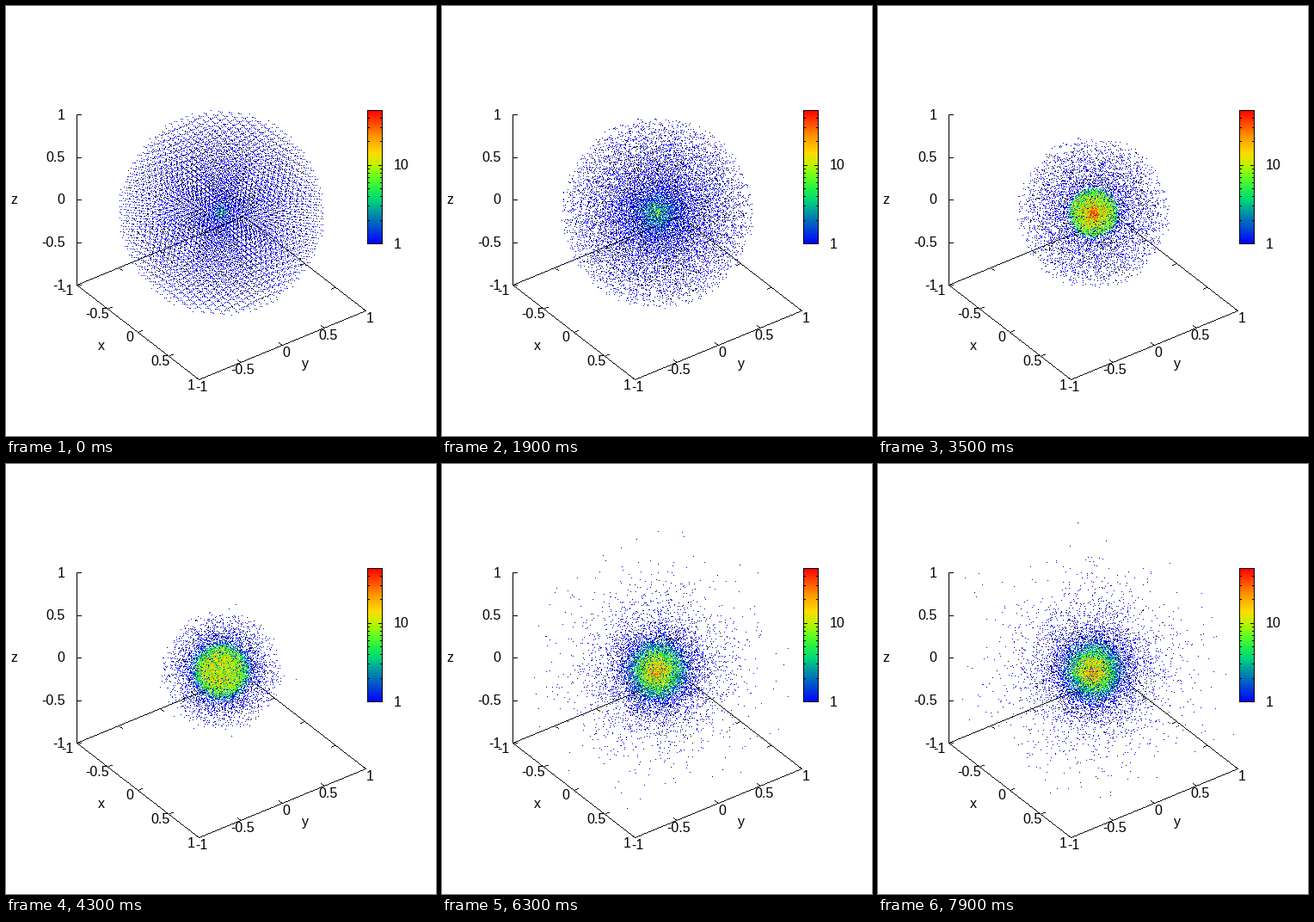
Recreate the animation shown at these times as a matplotlib script. Size 500 px wide and 500 px high, loop 8 s.

```python
import numpy as np
import matplotlib.pyplot as plt
from matplotlib.animation import FuncAnimation

SIZE, FRAMES, STEP = 500, 80, 100
plt.rcParams["font.family"] = "Liberation Sans"

fig = plt.figure(figsize=(5, 5), dpi=100, facecolor="white")
ax = fig.add_axes([0, 0, 1, 1])
ax.axis("off")
base = np.ones((SIZE, SIZE, 3))


# --- static plot box, drawn as crisp one-pixel lines ---
def project(x, y, z):
    return 250 + 71 * x + 97 * y, 240 + 55 * x - 40 * y - 99 * z


def to_pixels(v):
    return np.floor(np.asarray(v) + .5).astype(int)


def line(a, b):
    count = int(max(abs(b[0] - a[0]), abs(b[1] - a[1]))) + 1
    col, row = (np.linspace(a[k], b[k], count) for k in (0, 1))
    base[to_pixels(row), to_pixels(col)] = 0


def outline(points):
    for a, b in zip(points, points[1:] + points[:1]):
        line(a, b)


def tick(p, dx, dy):
    line(p, (p[0] + dx, p[1] + dy))


def label(x, y, text, ha="center"):
    ax.text(x, y + 5.5, text, ha=ha, va="baseline", size=11.52)


outline([project(x, y, -1) for x, y in ((-1, -1), (1, -1), (1, 1), (-1, 1))])
line(project(-1, -1, -1), project(-1, -1, 1))

for v in (-1, -.5, 0, .5, 1):
    text, shift = f"{v:g}", -2 if v < 0 else 0
    px, py = project(v, -1, -1)
    label(px - 9 + shift, py + 6, text)
    tick((px, py), 5, -2)
    tick(project(v, 1, -1), -5, 2)
    px, py = project(1, v, -1)
    label(px + 5 + shift, py + 9, text)
    tick((px, py), -4, -3)
    tick(project(-1, v, -1), 4, 3)
    px, py = project(-1, -1, v)
    label(68.5, py, text, "right")
    tick((px, py), 5, 0)

label(111, 394, "x")
label(348, 416, "y")
label(9.5, 225, "z")

# --- colour scale, logarithmic from 1 to 50 ---
STOPS = [0, .25, .33, .42, .5, .59, .68, .8, 1]
REDS = [0, 0, 0, .16, .4, .75, 1, 1, 1]
GREENS = [0, .63, .85, .94, 1, .95, .86, .6, 0]
BLUES = [1, .62, .47, .27, .12, 0, 0, 0, 0]


def palette(v):
    return np.stack([np.interp(v, STOPS, c) for c in (REDS, GREENS, BLUES)], -1)


base[121:277, 420:438] = palette(np.linspace(1, 0, 156))[:, None]
outline([(420, 121), (437, 121), (437, 276), (420, 276)])
for k in [*range(2, 11), 20, 30, 40]:
    y = 276 - 155 * np.log(k) / np.log(50)
    size = 4 if k == 10 else 2
    tick((420, y), size, 0)
    tick((437, y), -size, 0)
label(451, 276, "1", "left")
label(451, 185, "10", "left")

# --- gas sphere: stretched lattice with density ~ 1/r ---
rng = np.random.default_rng(7)
n = 15
side = np.arange(1 - n, n) / n
grid = np.stack(np.meshgrid(side, side, side, indexing="ij"), -1).reshape(-1, 3)
dist = np.linalg.norm(grid, axis=1)
keep = (dist > 0) & (dist < 1)
grid, dist = grid[keep], dist[keep]
mix = rng.permutation(len(dist))
grid, dist = grid[mix], dist[mix]
N = len(dist)
r0 = dist ** 1.5
heading = grid / dist[:, None]

swirl = rng.normal(size=(N, 3))
scatter = rng.normal(size=(N, 3))
phase = rng.uniform(0, 2 * np.pi, (2, N))
grain = rng.normal(size=N)
dark = rng.random(N) < .25
delay = rng.uniform(0, .1, N)

# relaxed radii follow a Plummer sphere
q = rng.uniform(0, .99, N)
relaxed = .21 / np.sqrt(np.maximum(q, 1e-6) ** (-2 / 3) - 1)
omega = 2.5 / (.1 + relaxed)

ETA = np.linspace(0, np.pi / 2, 600)
FALL_T = (ETA + np.sin(2 * ETA) / 2) * 2 / np.pi
FALL_R = np.cos(ETA) ** 2


def clock(i):
    return max(0, .02 * i - .01)


def fall(r, t):
    """Radius of a freely falling shell that started at r."""
    return r * np.interp(t / (.555 * (1 + r ** 4)), FALL_T, FALL_R)


def shock(t):
    return .24 * min(1, t / .69) ** 1.2


shells = np.linspace(1e-3, 1, 4000)


def swallowed(t):
    """Starting radius of the shell that now meets the shock."""
    return shells[max(0, np.sum(fall(shells, t) <= shock(t)) - 1)]


times = np.array([clock(i) for i in range(FRAMES)])
met = np.interp(r0, [swallowed(t) for t in times], times)
bounce = np.maximum(.73, met) + delay


def density(r):
    """Mean density of a thin shell around each radius."""
    ranked = np.sort(r)
    lo = np.maximum(.9 * r - .015, 0)
    hi = 1.1 * r + .015
    count = np.searchsorted(ranked, hi) - np.searchsorted(ranked, lo)
    # beyond the outermost particle the shell is empty
    hi = np.minimum(hi, ranked[-1] + .015)
    return count / N / (4 / 3 * np.pi * (hi ** 3 - lo ** 3))


def cloud(t):
    edge = swallowed(t)
    r = np.where(r0 < edge, shock(t) * r0 / edge, fall(r0, t))
    since = np.maximum(0, t - bounce)
    w = 1 - np.exp(-since / (.1 + .13 * relaxed))
    r = r + (relaxed - r) * w
    r = r * (1 + .12 * w * np.sin(omega * t + phase[0]))
    wobble = .3 * w * np.sin(omega * t + phase[1])
    stir = .05 * min(1, t / .4) ** 2
    d = heading + stir * scatter + wobble[:, None] * swirl
    d /= np.linalg.norm(d, axis=1)[:, None]
    return r, d * r[:, None]


view = dict(extent=(0, SIZE, SIZE, 0), aspect="auto", interpolation="nearest")
ax.imshow(base, zorder=0, **view)
layer = ax.imshow(np.zeros((SIZE, SIZE, 4)), zorder=1, **view)
ax.set_xlim(0, SIZE)
ax.set_ylim(SIZE, 0)


def draw(i):
    t = clock(i)
    r, pos = cloud(t)
    rho = density(r) * np.exp(.4 * min(1, t / .5) * grain)
    level = np.clip(np.log(rho) / np.log(50), 0, 1)
    rgb = palette(level)
    rgb[dark & (level == 0)] = 0
    inside = np.all(np.abs(pos) <= 1, axis=1)
    col, row = (to_pixels(p) for p in project(*pos[inside].T))
    img = np.zeros((SIZE, SIZE, 4))
    img[row, col, :3] = rgb[inside]
    img[row, col, 3] = 1
    layer.set_data(img)
    return [layer]


anim = FuncAnimation(fig, draw, frames=FRAMES, interval=STEP, repeat=True,
                     repeat_delay=0, blit=False)
plt.show()
```
